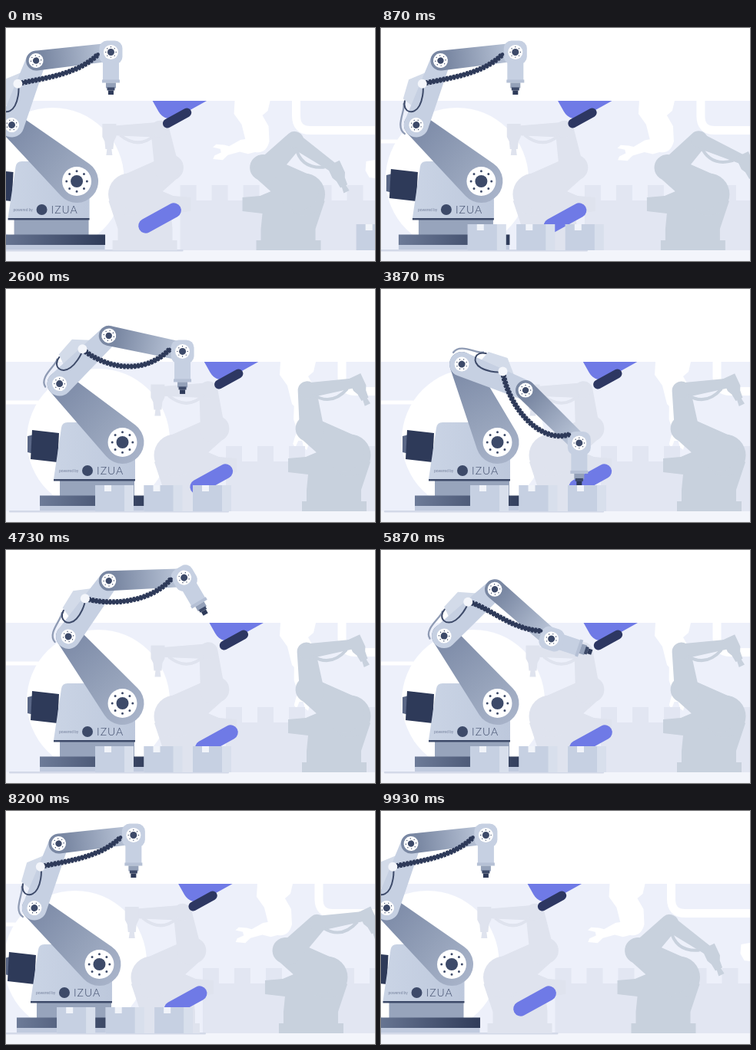
An HTML page that plays this animation: 480 px wide and 304 px high, repeating every 9990 ms.

```html
<!DOCTYPE html>
<html lang="en">
<head>
<meta charset="utf-8">
<title>Robot arm</title>
<style>
  html, body { margin: 0; width: 100%; height: 100%; overflow: hidden; background: #fff; }
  svg { display: block; width: 100vw; height: 100vh; }
  .light { fill: #c6d0e2; }
  .dark { fill: #2e3a59; }
  .mid { fill: #3d4a69; }
  .line { fill: none; stroke-linecap: round; }
  .far { fill: #dfe3ee; stroke: #dfe3ee; }
  .near { fill: #c8d1dd; stroke: #c8d1dd; }
  .sil { stroke-width: 0; }
  .sil .cord { fill: none; stroke-width: 4; }
  .blue { fill: #6f7ae6; }
  text { font-family: Lato, sans-serif; }
</style>
</head>
<body>
<svg viewBox="0 0 480 304" preserveAspectRatio="none">
  <defs>
    <clipPath id="band"><rect y="95" width="480" height="209"/></clipPath>
    <linearGradient id="lowerFill" gradientUnits="userSpaceOnUse" x1="-28" x2="112">
      <stop stop-color="#a8b3c9"/><stop offset=".45" stop-color="#94a1b9"/><stop offset="1" stop-color="#7c8aa7"/>
    </linearGradient>
    <linearGradient id="foreFill" gradientUnits="userSpaceOnUse" x1="10" x2="90">
      <stop stop-color="#7a88a3"/><stop offset="1" stop-color="#b9c4d7"/>
    </linearGradient>
    <linearGradient id="baseFill">
      <stop stop-color="#6d7b98"/><stop offset="1" stop-color="#303c5a"/>
    </linearGradient>
    <linearGradient id="bodyFill">
      <stop stop-color="#cad4e5"/><stop offset="1" stop-color="#bdc8dc"/>
    </linearGradient>
  </defs>

  <rect width="480" height="304" fill="#fff"/>
  <rect y="95" width="480" height="196" fill="#edf0fa"/>
  <rect y="290" width="480" height="14" fill="#f3f5fb"/>

  <g clip-path="url(#band)">
    <g class="scene">
      <path d="M-60 148H41" class="line" stroke="#fff" stroke-width="5"/>
      <path d="M437 80V115Q437 133.500 455 133.500H620" class="line" stroke="#fff" stroke-width="11"/>
      <circle cx="120" cy="197" r="93" fill="#fff"/>
      <g fill="#fff">
        <path d="M357 95H403L400 108 393 114 401 128 402 148Q398 164 384 162L372 150 366 126 356 112Z"/>
        <path id="claw" d="M-8 -9L12 -10 22 -5 38 -6 46 -11 58 -7 55 -3 46 -1 46 4 55 8 50 11 40 8 34 5 18 10 -6 9Z"/>
        <path d="M528 174L540 172V196L532 195 527 186Z"/>
      </g>
      <g id="wall" fill="#e2e6f2"><rect x="286" y="225" width="260" height="65"/></g>
      <rect x="4" y="289" width="286" height="2.500" rx="1" fill="#d3d9e8"/>
      <g id="farBot" class="sil far" transform="translate(667 0) scale(-1 1)"></g>
      <g id="nearBot" class="sil near"></g>
    </g>
    <g id="scanner">
      <g transform="translate(222.500 117.500) rotate(-29)">
        <rect class="blue" x="-17" y="-61" width="95" height="60" rx="18"/>
        <rect x="-20.500" y="-6" width="41" height="12" rx="6" fill="#2d3762"/>
      </g>
      <rect class="blue" x="-30.500" y="-9.500" width="61" height="19" rx="9.500" transform="translate(200 248) rotate(-29)"/>
    </g>
  </g>

  <g class="scene">
    <path d="M28 192L36 190V215L28 213Z" fill="#5a6786"/>
    <path class="dark" d="M34 184L69 188 67 226 32 222Z"/>
    <rect x="44" y="283" width="144" height="6" fill="#c0cade"/>
    <rect x="70" y="250" width="97" height="20" fill="#97a4bc"/>
    <rect x="44" y="269.500" width="144.500" height="13.500" fill="url(#baseFill)"/>
    <path d="M62 248L72 181Q73 174 80 174H142L168 212V248Z" fill="url(#bodyFill)"/>
    <rect class="mid" x="62" y="248" width="106" height="2.500"/>
    <text x="69" y="238.500" font-size="4.900" fill="#76829d">powered by</text>
    <circle class="mid" cx="106" cy="237" r="7"/>
    <text x="118" y="242" font-size="14" letter-spacing="1" font-weight="300" fill="#3d4a69">IZUA</text>

    <g id="lower"></g>
    <g id="hub" transform="translate(151.500 200)"></g>
    <g id="upper">
      <path class="line" d="M20 -25C14 -20 -13 -25 -16 -10" stroke="#8f9bb4" stroke-width="2.300"/>
      <path d="M20 -10L26 -28 52 -30 69 -12Z" fill="#d3dbe9"/>
    </g>
    <g id="fore"></g>
    <g id="head">
      <rect class="light" x="8" y="-10.500" width="29" height="21"/>
      <rect x="36" y="-11.500" width="4" height="23" fill="#b5c0d5"/>
      <rect x="40" y="-6.500" width="7" height="13" fill="#94a1b9"/>
      <rect class="mid" x="46" y="-5" width="4" height="10"/>
      <rect class="dark" x="50" y="-3.500" width="5.500" height="7"/>
      <rect class="light" x="-15" y="-15" width="31" height="30" rx="10"/>
    </g>
    <path id="hoseCore" class="line" stroke="#2e3a59" stroke-width="4.500"/>
    <path id="hoseBeads" fill="none" stroke="#2e3a59" stroke-width="7" stroke-dasharray="3.200 1.300"/>
    <circle id="ball" r="6" fill="#f4f6fb"/>
  </g>
  <g class="scene"><g id="boxes"></g></g>
</svg>

<script>
const LOOP = 9990;
const HUB = [151.5, 200], LOWER = 112, UPPER = 89.7, FORE = 98;
const SHOULDER = [398, 185];
const $ = id => document.getElementById(id);
const add = (id, markup) => $(id).insertAdjacentHTML('beforeend', markup);
const place = (el, [x, y], turn = 0) => el.setAttribute('transform', `translate(${x} ${y}) rotate(${turn})`);

// Progress from 0 to 1 between two times, and its smooth form.
const part = (t, from, to) => Math.min(1, Math.max(0, (t - from) / (to - from)));
const ease = (t, from, to) => (1 - Math.cos(Math.PI * part(t, from, to))) / 2;

// Point at local (x, y) of a part standing at p and turned by deg.
function local([px, py], deg, x, y) {
  const a = deg * Math.PI / 180, c = Math.cos(a), s = Math.sin(a);
  return [px + x * c - y * s, py + x * s + y * c];
}

// Tapered bar with round ends, along the x axis.
function bar(len, r1, r2) {
  const s = (r1 - r2) / len, c = Math.sqrt(1 - s * s);
  const x1 = r1 * s, x2 = len + r2 * s;
  return `M${x1} ${-r1 * c}L${x2} ${-r2 * c}A${r2} ${r2} 0 0 1 ${x2} ${r2 * c}` +
    `L${x1} ${r1 * c}A${r1} ${r1} 0 1 1 ${x1} ${-r1 * c}Z`;
}

function joint(r, core, dot, x = 0) {
  return `<g transform="translate(${x})"><circle r="${r}" fill="#fff"/><circle class="mid" r="${core}"/>
    <circle r="${r * .7}" class="line" stroke="#3d4a69" stroke-width="${dot}" pathLength="8" stroke-dasharray="0 1"/></g>`;
}

// Arm poses: directions of lower arm, upper arm, forearm and tool, then hose sag.
const rest = [221, -69.4, -6.5, 90, 0];
const hover = [224, -34, 19, 90, 20];
const pick = [245.5, 22.3, 44.6, 90, 17];
const lift = [231, -55, -6, 70, 10];
const aim = [231.7, -42.7, 41.3, 18.4, 0];
const steps = [
  [0, rest], [900, rest], [3000, hover], [3870, pick], [4050, pick],
  [4500, lift], [5870, aim], [6650, aim], [8000, rest], [LOOP, rest]
];

// Monotone spline through the poses, so the arm passes a pose without stopping.
function armPose(t) {
  let k = 0;
  while (t >= steps[k + 1][0]) k++;
  const rate = (i, v) => (steps[i + 1][1][v] - steps[i][1][v]) / (steps[i + 1][0] - steps[i][0]);
  const slope = (i, v) => {
    if (i === 0 || i === steps.length - 1) return 0;
    const d = rate(i - 1, v), e = rate(i, v);
    return d * e <= 0 ? 0 : 2 * d * e / (d + e);
  };
  const [from, a] = steps[k], [to, b] = steps[k + 1];
  const span = to - from, p = (t - from) / span, q = 1 - p;
  return a.map((start, v) => start * q * q * (1 + 2 * p) + b[v] * p * p * (3 - 2 * p) +
    span * p * q * (q * slope(k, v) - p * slope(k + 1, v)));
}

add('lower', `<path d="${bar(LOWER, 28, 16)}" fill="url(#lowerFill)"/>`);
add('hub', joint(19, 8, 3));
add('upper', `<path class="light" d="${bar(UPPER, 16, 13)}"/>
  <path class="line" d="M53 -11C45 -6 32 -4 25 -5C10 -7 9 -23 24 -25" stroke="#3d4a69" stroke-width="2"/>${joint(9.5, 4.5, 1.4)}`);
add('fore', `<path d="${bar(FORE, 13, 12)}" fill="url(#foreFill)"/>${joint(9.5, 4.2, 1.4)}`);
add('head', joint(9.5, 4.5, 1.4));

for (let i = 0; i < 6; i++) {
  add('wall', `<rect x="${286 + i * 41 + (i > 3 ? 12 : 0)}" y="205" width="21" height="21"/>`);
}
for (let i = 0; i < 3; i++) {
  add('boxes', `<g transform="translate(${116 + i * 63.5} 256)">
    <rect width="50" height="34" fill="#d8dfec"/><rect class="light" width="38" height="34"/>
    <rect x="12" width="9" height="8" fill="#f1f4fa"/></g>`);
}

// Background robot; returns a function that sets its arm, forearm and gripper.
function silhouette(id) {
  add(id, `<path d="M367 221L390 219 416 208 447 200 474 226 462 262V277H469V290H385V277H391V262L393 242 367 239Z"/>
    <circle cx="447" cy="217" r="27.500"/>
    <path d="${bar(58, 17, 26)}" transform="translate(${SHOULDER}) rotate(33)"/>
    <path d="${bar(53, 16, 12)}"/>
    <g><path d="${bar(66, 10, 6)}"/><path class="cord" d="M6 6Q28 26 52 6"/></g>
    <path d="M-9 -9H8L14 -6 24 -5V-3L32 -4V4L24 3V5L14 6 8 9H-9Z"/>`);
  const [arm, fore, tool] = [...$(id).children].slice(3);
  return (a, b, c) => {
    const elbow = local(SHOULDER, a, 53, 0);
    place(arm, SHOULDER, a);
    place(fore, elbow, b);
    place(tool, local(elbow, b, 66, 0), c);
  };
}
const poseNear = silhouette('nearBot'), poseFar = silhouette('farBot');
const scenes = document.querySelectorAll('.scene');

function poseArm([a, b, c, d, sag]) {
  const p1 = local(HUB, a, LOWER, 0), p2 = local(p1, b, UPPER, 0), p3 = local(p2, c, FORE, 0);
  place($('lower'), HUB, a);
  place($('upper'), p1, b);
  place($('fore'), p2, c);
  place($('head'), p3, d);

  const start = local(p1, b, 53, -11.5), end = local(p2, c, 81, 1);
  const [x1, y1] = local(p1, b, 68.5, 10.6), [x2, y2] = local(p2, c, 50, 26);
  const curve = `M${start}C${x1} ${y1 + sag} ${x2} ${y2 + sag} ${end}`;
  $('hoseCore').setAttribute('d', curve);
  $('hoseBeads').setAttribute('d', curve);
  place($('ball'), start);
}

function draw() {
  const t = performance.now() % LOOP;
  const shift = 59.5 * (Math.sin(part(t, 0, 1950) * Math.PI / 2) - ease(t, 6450, 9930));
  const drift = 14.5 * Math.sin(Math.PI * t / LOOP) ** 2;
  const reach = ease(t, 700, 2800) - ease(t, 6000, 8200);
  const raise = ease(t, 0, 2600) - ease(t, 8200, 9900);
  const boxes = 400 * ((1 - part(t, 0, 1350)) ** 3 - part(t, 7100, 10100) ** 3);

  scenes.forEach(el => place(el, [shift - 59.5, 0]));
  place($('scanner'), [shift + drift, 0]);
  place($('boxes'), [boxes, 0]);
  place($('claw'), [384, 152], 168 - 80 * reach);
  poseNear(-46 - 52 * reach, 35 - 44 * raise, 65);
  poseFar(-80 - 4 * reach, 1, 90);
  poseArm(armPose(t));
  requestAnimationFrame(draw);
}
draw();
</script>
</body>
</html>
```
